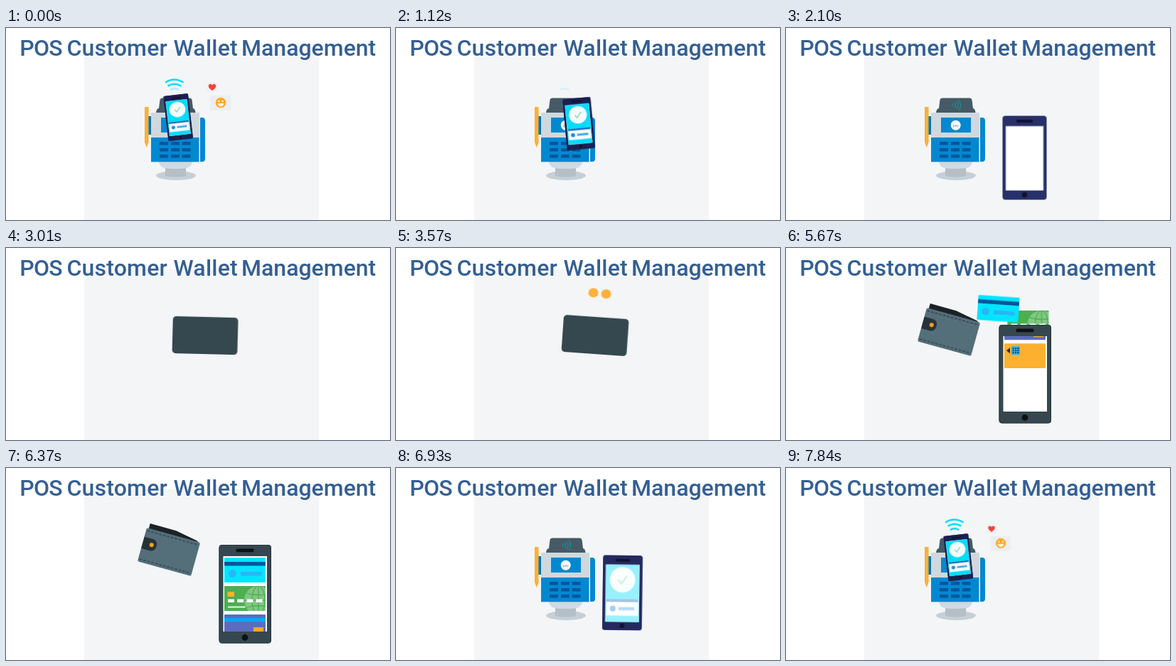
An HTML page without scripts for the animation above (7.91 s loop, 540 px wide and 270 px high).

```html
<!DOCTYPE html>
<html lang="en">
<head>
<meta charset="utf-8">
<title>POS Customer Wallet Management</title>
<style>
html, body { margin: 0; width: 100%; height: 100%; overflow: hidden; background: #fff; }
svg { display: block; width: 540px; height: 270px; }
.title { font: 500 32px Roboto, "Open Sans", sans-serif; fill: #345f93; }

/* every part shares one 7.91 s clock */
.t { animation: 7910ms linear infinite; }

/* scenes */
.pay { animation-name: pay; animation-timing-function: step-end; }
.coins { animation-name: coins; animation-timing-function: step-end; }
.wallet { animation-name: wallet; animation-timing-function: step-end; }
@keyframes pay { 0% { visibility: visible } 33.62%, 82.29% { visibility: hidden } 82.3%, 100% { visibility: visible } }
@keyframes coins { 0% { visibility: hidden } 33.62% { visibility: visible } 64.6%, 100% { visibility: hidden } }
@keyframes wallet { 0% { visibility: hidden } 64.6% { visibility: visible } 82.3%, 100% { visibility: hidden } }

/* paying at the terminal */
.tap { animation-name: tap; animation-timing-function: ease-in-out; }
@keyframes tap {
  0%, 11.5%, 92%, 100% { transform: translate(242.3px, 125.7px) rotate(-6.5deg) scale(.565, .54) }
  21.2%, 82.3% { transform: translate(335.5px, 182.5px) rotate(0deg) scale(1, 1) }
  85.4% { transform: translate(342px, 191px) rotate(3deg) scale(1, 1) }
}
.app { animation-name: app; }
@keyframes app { 0%, 22.1%, 90%, 100% { opacity: 1 } 26.3%, 86% { opacity: 0 } }
.signal { animation-name: signal; }
@keyframes signal { 0%, 22.1%, 93.5%, 100% { opacity: 1 } 26.3%, 91.5% { opacity: 0 } }
.wave { animation: 791ms linear infinite; }
.w1 { animation-name: w1; }
.w2 { animation-name: w2; }
.w3 { animation-name: w3; }
@keyframes w1 { 0%, 100% { opacity: .3 } 10%, 40% { opacity: 0 } 54%, 91% { opacity: 1 } }
@keyframes w2 { 0%, 10%, 68%, 100% { opacity: 1 } 22%, 54% { opacity: 0 } }
@keyframes w3 { 0%, 20%, 82%, 100% { opacity: 1 } 32%, 68% { opacity: 0 } }
.heart { animation-name: heart; }
@keyframes heart {
  0%, 100% { transform: translate(290px, 83px) scale(1) }
  1.8%, 11.5% { transform: translate(290px, 82.5px) scale(1) }
  13.5%, 95.6% { transform: translate(287px, 100px) scale(0) }
  99.115% { transform: translate(289px, 85.5px) scale(.9) }
}
.face { animation-name: face; }
@keyframes face {
  0%, 11.5%, 100% { transform: translate(302px, 105px) scale(1) }
  13.5%, 94.7% { transform: translate(294px, 112px) scale(0) }
  99.115% { transform: translate(302px, 105.8px) scale(.97) }
}

/* coins into the phone */
.turn { animation-name: turn; animation-timing-function: ease-in-out; }
@keyframes turn {
  0%, 33.62% { transform: translate(280px, 123px) rotate(-94deg) scale(.5) }
  36.5% { transform: translate(280px, 123px) rotate(-86deg) scale(.79) }
  40.5% { transform: translate(280px, 123px) rotate(-94deg) scale(.79) }
  44.5%, 46.5% { transform: translate(280px, 123px) rotate(-86deg) scale(.79) }
  52%, 100% { transform: translate(276px, 165.5px) rotate(0deg) scale(1) }
}
.toss1 { animation-name: toss1; }
.toss2 { animation-name: toss2; }
@keyframes toss1 {
  0%, 38% { transform: translate(278px, 123px) }
  42% { transform: translate(275px, 72px) }
  45.13% { transform: translate(277.5px, 62.5px) }
  48%, 100% { transform: translate(279px, 130px) }
}
@keyframes toss2 {
  0%, 39% { transform: translate(282px, 123px) }
  43% { transform: translate(293px, 74px) }
  45.13% { transform: translate(295.5px, 64.3px) }
  48.4%, 100% { transform: translate(283px, 130px) }
}
.front { animation-name: front; }
@keyframes front { 0%, 49.5% { opacity: 0 } 52%, 100% { opacity: 1 } }
.fill { animation-name: fill; animation-timing-function: ease-out; }
@keyframes fill { 0%, 51.5% { transform: scaleY(0) } 54.8%, 100% { transform: scaleY(1) } }
.coin { animation-name: coin; animation-timing-function: ease-in-out; }
@keyframes coin {
  0%, 52.5% { transform: scale(0) }
  54.86%, 55.75%, 60.17%, 100% { transform: scale(1) }
  57.3% { transform: scale(1.13) }
  58.8% { transform: scale(.96) }
}

/* cards from wallet to phone */
.fly { animation-name: fly; }
@keyframes fly {
  0%, 64.6% { transform: translate(231px, 117px) rotate(15.5deg) }
  65.49% { transform: translate(262px, 90px) rotate(11deg) }
  66.37% { transform: translate(298px, 85.5px) rotate(4deg) }
  67.26% { transform: translate(326px, 77px) rotate(1deg) }
  68.14% { transform: translate(340.5px, 105px) rotate(0deg) }
  69.03%, 100% { transform: translate(336px, 130px) rotate(0deg) }
}
.stack { animation-name: stack; }
@keyframes stack {
  0%, 68.5% { transform: translateY(-157px) }
  71.68% { transform: translateY(-112px) }
  79.65%, 100% { transform: translateY(0) }
}
</style>
</head>
<body>
<svg viewBox="0 0 540 270">
  <defs>
    <clipPath id="card"><rect width="58" height="35" rx="1"/></clipPath>
    <clipPath id="glass"><rect x="305.5" y="124" width="61.5" height="106"/></clipPath>

    <g id="cyan">
      <rect width="58" height="35" rx="1" fill="#00e5ff"/>
      <rect y="6" width="58" height="5.5" fill="#01579b"/>
      <circle cx="11.5" cy="22.5" r="5.2" fill="#29b6f6"/>
      <rect x="23" y="20" width="29.5" height="5.5" fill="#29b6f6"/>
    </g>
    <g id="green" clip-path="url(#card)">
      <rect width="58" height="35" fill="#4caf50"/>
      <circle cx="48" cy="20" r="20" fill="#81c784"/>
      <g fill="none" stroke="#4caf50" stroke-width="1.3">
        <ellipse cx="48" cy="20" rx="9" ry="20"/>
        <path d="M48 0v40M28 20h40M31 10q17 5 34 0M31 30q17-5 34 0"/>
      </g>
      <rect x="4.5" y="8" width="9.5" height="7" fill="#ffb02e"/>
      <path d="M5 20.7h51" stroke="#fff" stroke-width="4.4" stroke-dasharray="9 4.2"/>
      <path d="M5 29.5h24.5" stroke="#e8f5e9" stroke-width="2"/>
    </g>
    <g id="purple">
      <rect width="58" height="35" rx="1" fill="#5c6bc0"/>
      <rect y="5" width="58" height="5.5" fill="#03a9f4"/>
      <rect x="41" y="18" width="14" height="13" fill="#ffa726"/>
    </g>
    <g id="orange">
      <rect width="58" height="35" rx="1" fill="#fdb02f"/>
      <path d="M3 10l5-4v8z" fill="#1a2a6c"/>
      <rect x="10" y="4" width="12" height="12" fill="#29b6f6"/>
      <path d="M11.5 7h9M11.5 10h9M11.5 13h9" stroke="#1a3c7c" stroke-width="1.8" stroke-dasharray="2.2 1.2"/>
    </g>
    <g id="keys" fill="#01579b">
      <rect x="216" width="12" height="4.5"/>
      <rect x="232" width="12" height="4.5"/>
      <rect x="247.5" width="12" height="4.5"/>
    </g>
  </defs>

  <rect x="110" y="30" width="330" height="240" fill="#f3f5f7"/>
  <text class="title" y="39"><tspan x="19.3" letter-spacing="-.8">POS</tspan> <tspan x="85.5" letter-spacing=".2">Customer</tspan> <tspan x="235.5" letter-spacing=".2">Wallet</tspan> <tspan x="331">Management</tspan></text>

  <g class="t pay">
    <!-- terminal -->
    <ellipse cx="239" cy="207.5" rx="28" ry="6.5" fill="#c6cfd5"/>
    <path d="M224 195h29v13q-14.500 3-29 0z" fill="#b4bfc7"/>
    <path d="M215 188h47q-1 7-8 9-15.500 2-31 0-7-2-8-9z" fill="#d3d9de"/>
    <path d="M273 126h3q4 0 4 4.500v53q0 4.500-4 4.500h-3z" fill="#0288d1"/>
    <rect x="200" y="124" width="4" height="26" fill="#0277bd"/>
    <path d="M195 111h5.500v50l-2.700 7-2.800-7z" fill="#fbb034"/>
    <path d="M220 98.500h38q3 0 3.600 3l1.400 11.500q3 .5 3.500 6h-55.500q.5-5.500 4-6l1.400-11.500q.6-3 3.600-3z" fill="#455a64"/>
    <path d="M234 106.500q1.500 2 0 4M237 104.500q2.700 4 0 8M240 102.800q4 5.700 0 11.400M243 101.300q5 7.200 0 14.400" fill="none" stroke="#1c8c9c" stroke-width="1.3"/>
    <rect x="204" y="119" width="68" height="36" fill="#d0d8dd"/>
    <rect x="218" y="126" width="42" height="21" fill="#0288d1"/>
    <circle cx="238.7" cy="136.7" r="7" fill="#fff"/>
    <text x="238.7" y="138.500" text-anchor="middle" font-family="Roboto, sans-serif" font-size="5" fill="#78909c">pay</text>
    <rect x="204" y="154" width="67.5" height="34.3" fill="#0288d1"/>
    <use href="#keys" y="160"/>
    <use href="#keys" y="169"/>
    <use href="#keys" y="178"/>

    <g class="t signal" fill="none" stroke="#08dcfa" stroke-width="2.6" stroke-linecap="round">
      <path class="wave w3" d="M225 76q11.500-7 23.500 0"/>
      <path class="wave w2" d="M228.500 81.200q8.500-4.800 17 0"/>
      <path class="wave w1" d="M232 86.500q5-2.800 10 0"/>
    </g>
    <g class="t heart">
      <rect x="-8" y="-6" width="16" height="13" rx="1" fill="#eff1f4"/>
      <path d="M0 5C-4 2-5.200 .5-5.200-1.500-5.200-4.800-1.300-5 0-2.500 1.300-5 5.200-4.800 5.200-1.500 5.200 .5 4 2 0 5z" fill="#f44336"/>
    </g>
    <g class="t face">
      <path d="M-14.500-10h29v20.500h-25l-4 2z" fill="#eceff2"/>
      <circle r="7.3" fill="#ffa92b"/>
      <g fill="#fff4de">
        <circle cx="-2.700" cy="-2" r="1.200"/>
        <circle cx="2.700" cy="-2" r="1.200"/>
        <path d="M-4.500 1h9q-.8 4.200-4.500 4.200t-4.500-4.200z"/>
      </g>
    </g>

    <g class="t tap">
      <rect x="-31" y="-59" width="62" height="118" rx="4" fill="#27306a"/>
      <rect class="t app" x="-31" y="-59" width="62" height="118" rx="4" fill="#1c1f52"/>
      <rect x="-11.5" y="-53.500" width="23" height="4" rx="1.5" fill="#10122c"/>
      <circle cy="52" r="3.7" fill="#10122c"/>
      <rect x="-26.5" y="-44.5" width="53" height="90.5" fill="#fff"/>
      <g class="t app">
        <rect x="-26.5" y="-44.5" width="53" height="90.5" fill="#00dcfa"/>
        <circle cy="-20.5" r="20" fill="#f2fcff"/>
        <path d="M-7-20.500l5 6 9-12" fill="none" stroke="#9ccfb0" stroke-width="2.5"/>
        <rect x="-25" y="10" width="50" height="26" rx="1" fill="#f8fcfe"/>
        <rect x="-25" y="10" width="50" height="4.5" fill="#1d6fb8"/>
        <circle cx="-15" cy="25" r="4.5" fill="#1e88e5"/>
        <path d="M-6 25h25" stroke="#42a5f5" stroke-width="5"/>
      </g>
    </g>
  </g>

  <g class="t coins">
    <ellipse class="t toss1" rx="7" ry="6.6" fill="#ffb13b"/>
    <ellipse class="t toss2" rx="7" ry="6.6" fill="#ffb13b"/>
    <g class="t turn">
      <rect x="-33" y="-58" width="66" height="116" rx="6" fill="#35474f"/>
      <g class="t front">
        <rect x="-12.5" y="-52.5" width="25" height="2.8" rx="1" fill="#0c1114"/>
        <rect x="-9" y="50" width="18" height="4.5" rx="1" fill="#0c1114"/>
        <rect x="-30.5" y="-44.5" width="61" height="90" fill="#e8f3ea"/>
        <g transform="translate(0 45.5)"><rect class="t fill" x="-30.5" y="-81" width="61" height="81" fill="#4caf50"/></g>
      </g>
      <g transform="translate(-.5 -5.5)">
        <g class="t coin">
          <circle r="21.3" fill="#ffb02e"/>
          <circle r="16.5" fill="#ffa726" stroke="#f7941d" stroke-width="1.5"/>
          <text y="9.5" text-anchor="middle" font-family="Roboto, sans-serif" font-size="27" fill="#ef8500">$</text>
        </g>
      </g>
    </g>
  </g>

  <g class="t wallet">
    <path transform="translate(198 84) rotate(15.5)" d="M3-7h38l33 6v4h-71z" fill="#1c2226"/>
    <g class="t fly"><use href="#orange" x="-29" y="-17.5"/></g>
    <g class="t fly" style="animation-delay:140ms"><use href="#purple" x="-29" y="-17.5"/></g>
    <g class="t fly" style="animation-delay:280ms"><use href="#green" x="-29" y="-17.5"/></g>
    <g class="t fly" style="animation-delay:420ms"><use href="#cyan" x="-29" y="-17.5"/></g>
    <g transform="translate(198 84) rotate(15.5)">
      <rect width="78" height="49" rx="2.5" fill="#546e7a"/>
      <path d="M2 3.800h74M2 45.200h74" stroke="#2b3b43" stroke-width="1.2" stroke-dasharray="3.5 2.2"/>
      <path d="M0 13h12q8 0 8 8.500t-8 8.500h-12z" fill="#263238"/>
      <circle cx="13" cy="21.5" r="3" fill="#ffa51f"/>
    </g>
    <rect x="299.5" y="108" width="73.5" height="138.5" rx="4" fill="#37474f"/>
    <rect x="300" y="108.5" width="72.5" height="137.5" rx="4" fill="none" stroke="#2a373d"/>
    <rect x="323.5" y="113.5" width="25" height="4.7" rx="1.5" fill="#0c1114"/>
    <circle cx="336" cy="238.5" r="4.4" fill="#0c1114"/>
    <rect x="305.5" y="124" width="61.5" height="106" fill="#fff"/>
    <g clip-path="url(#glass)">
      <g class="t stack">
        <use href="#cyan" x="307" y="126"/>
        <use href="#green" x="307" y="166"/>
        <use href="#purple" x="307" y="206"/>
        <use href="#orange" x="307" y="246"/>
      </g>
    </g>
  </g>
</svg>
</body>
</html>
```
